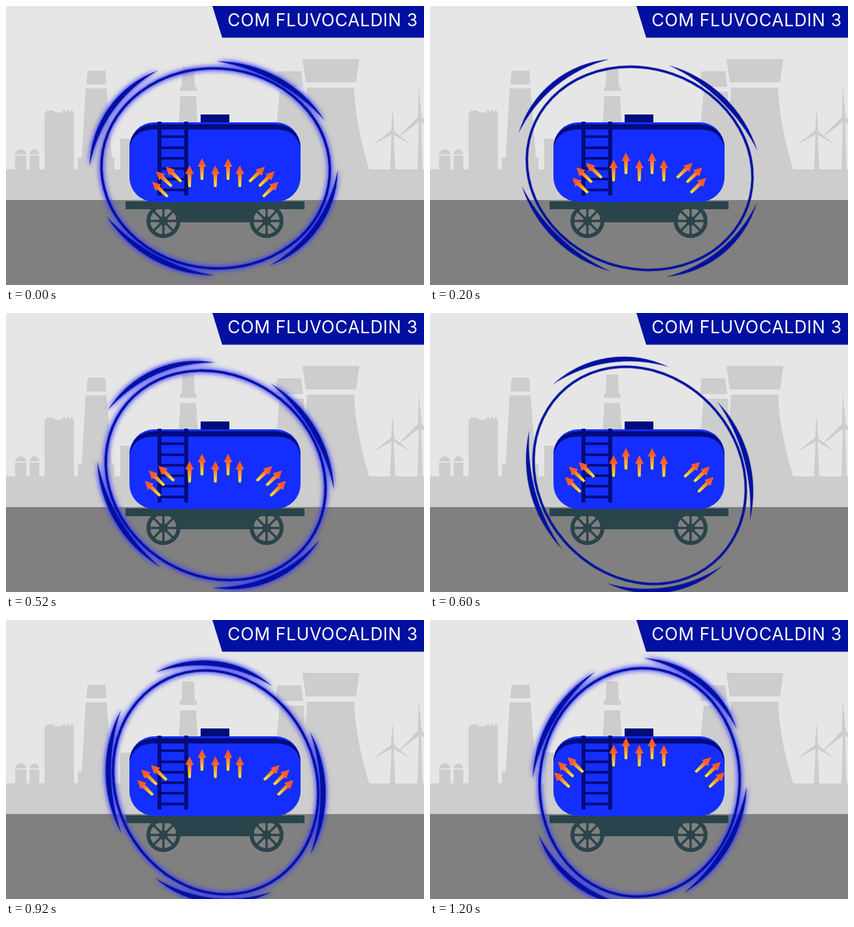
Write an HTML page that moves like this. It is 640 by 427 pixels and loops after 1.4 s.

```html
<!DOCTYPE html>
<html lang="pt">
<head>
<meta charset="utf-8">
<title>Vagão-tanque aquecido</title>
<style>
  html, body { margin: 0; width: 100%; height: 100%; overflow: hidden; }
  svg { display: block; width: 100%; height: 100%; }
  .title { font: 400 26.5px Inter, "Liberation Sans", sans-serif; letter-spacing: .6px; fill: #fff; text-anchor: middle; }
  .skyline { fill: #cdcdcd; }
  .navy { fill: #000c7c; }
  .steel { fill: #2a444b; }
  .halo { fill: #0010a0; animation: glow 1400ms step-end infinite; }
  .spin { animation: spin 1400ms steps(7) infinite; }
  .rise { animation: rise 1400ms steps(7) infinite; }
  .drift { animation: drift 1400ms steps(7) infinite; }
  @keyframes spin { to { transform: rotate(107.1deg); } }
  @keyframes rise { to { transform: translate(0, -61.8px); } }
  @keyframes drift { to { transform: translate(-39.7px, -42px); } }
  @keyframes glow {
    0%, 28.571%, 57.142%, 85.714% { filter: drop-shadow(0 0 3.5px #33f) drop-shadow(0 0 3px #44fa); }
    14.285%, 42.857%, 71.428%, 100% { filter: none; }
  }
</style>
</head>
<body>
<svg viewBox="0 0 640 427" preserveAspectRatio="none">
  <defs>
    <linearGradient id="heat" x1="0" y1="0" x2="0" y2="1">
      <stop offset=".3" stop-color="#ff5a28"/>
      <stop offset=".62" stop-color="#ffa32a"/>
      <stop offset=".9" stop-color="#ffdf30"/>
    </linearGradient>
    <path id="arrow" d="M0 0L6.5 13H3L2 33H-2L-3 13H-6.5Z" fill="url(#heat)"/>
    <g id="fan">
      <use href="#arrow" transform="translate(223.700 269) rotate(-46)"/>
      <use href="#arrow" transform="translate(229.700 253) rotate(-46)"/>
      <use href="#arrow" transform="translate(244.700 246) rotate(-46)"/>
    </g>
    <g id="wheel">
      <circle r="23" fill="none" stroke="#2a444b" stroke-width="6"/>
      <path d="M-22 0H22M0-22V22M-15.5-15.5L15.5 15.5M-15.5 15.5L15.5-15.5" stroke="#2a444b" stroke-width="3.500"/>
      <circle r="7" class="steel"/>
    </g>
    <path id="lead" d="M-190-2.700A159 159 0 0 1-85.500-149.300A212 212 0 0 0-190-2.700Z"/>
    <path id="trail" d="M1-164A198 198 0 0 1 167-73.400A287 287 0 0 0 1-164Z"/>
  </defs>

  <rect width="640" height="427" fill="#e6e6e6"/>

  <g class="skyline">
    <rect y="250" width="640" height="48"/>
    <path d="M14 250V229H31V250ZM36 250V229H51V250ZM14 227Q15 220 22.500 219Q30 220 31 227ZM36 227Q37 220 43.500 219Q50 220 51 227Z"/>
    <path d="M59 250V163H62V160H74V163H84L90 158V163L96 158V163L102 157V163H104V250Z"/>
    <path d="M125 99H152L154 120H123ZM122 126H154L162 232H166V250H110V232H116Z"/>
    <path d="M175 250V203H190V250Z"/>
    <path d="M270 94H288L289 124H292V130H266V124H269ZM267 138H291L294 190H264Z"/>
    <path d="M415 100H452L455 124H414ZM419 131H456L462 250H408Z"/>
    <path d="M454 81H541L536 117H459ZM461 125H533C535 175 546 215 556 250H438C450 215 459 170 461 125Z"/>
    <path d="M590.500 193H593.500L596 250H588ZM592 156L594.500 192L621 213L592 196L561 213L589.500 191Z"/>
    <path d="M632.500 172H635.500L638 250H630ZM632 122L636.500 170L660 190L634 176L597 204L630.500 170Z"/>
  </g>

  <rect y="297" width="640" height="130" fill="#808080"/>

  <path d="M316 0H640V48.500H331Z" fill="#0010a0"/>
  <text class="title" x="485" y="31">COM FLUVOCALDIN 3</text>

  <rect class="steel" x="260" y="310" width="120" height="21"/>
  <use href="#wheel" x="241" y="329"/>
  <use href="#wheel" x="399" y="329"/>
  <rect class="steel" x="183" y="299" width="274" height="12"/>

  <rect class="navy" x="298" y="166" width="44" height="13"/>
  <rect x="189" y="178" width="262" height="122" rx="38" fill="#142eff"/>
  <path class="navy" d="M189 217C190 195 205 181 230 181H410C435 181 450 195 451 217C446 198 435 189 412 189H228C205 189 194 198 189 217Z"/>
  <path d="M235 177V290M276 177V290" stroke="#000c7c" stroke-width="6"/>
  <path d="M235 200H276M235 217H276M235 233H276M235 249H276M235 265H276M235 281.500H276" stroke="#000c7c" stroke-width="4"/>

  <g class="rise">
    <use href="#arrow" x="281" y="244"/>
    <use href="#arrow" x="300" y="233"/>
    <use href="#arrow" x="320.500" y="244"/>
    <use href="#arrow" x="340" y="233"/>
    <use href="#arrow" x="358" y="244"/>
  </g>
  <g class="drift"><use href="#fan"/></g>
  <g transform="translate(641 0) scale(-1 1)">
    <g class="drift"><use href="#fan"/></g>
  </g>

  <g class="halo">
    <g transform="translate(321 248.500)">
      <g class="spin">
        <ellipse rx="175" ry="153" transform="rotate(4)" fill="none" stroke="#0010a0" stroke-width="3.800"/>
        <use href="#trail"/>
        <use href="#trail" transform="rotate(180)"/>
      </g>
    </g>
    <g transform="translate(318 248)">
      <g class="spin">
        <use href="#lead"/>
        <use href="#lead" transform="rotate(180)"/>
      </g>
    </g>
  </g>
</svg>
</body>
</html>
```
